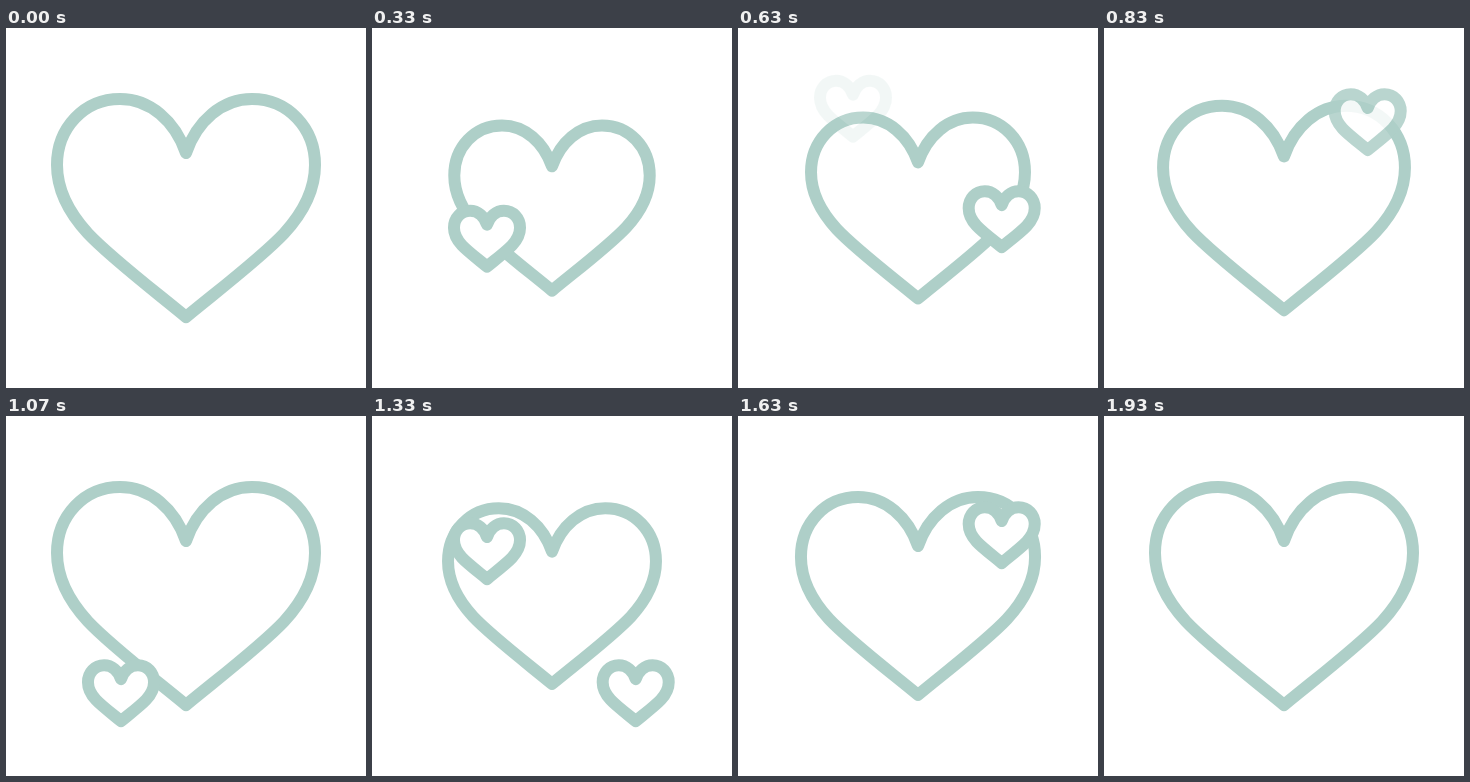
Write an HTML page without scripts that moves like this. It is 360 px wide and 360 px high and loops after 2 s.

```html
<!DOCTYPE html>
<html lang="en">
<head>
<meta charset="utf-8">
<title>Beating heart</title>
<style>
  /* clock in ticks, 30 per second */
  @property --t {
    syntax: "<number>";
    inherits: true;
    initial-value: 0;
  }

  html, body {
    margin: 0;
    width: 100%;
    height: 100%;
    overflow: hidden;
    background: #fff;
  }

  svg {
    display: block;
    width: 360px;
    height: 360px;
    animation: tick 2s steps(60) -5ms infinite;
  }

  @keyframes tick {
    from { --t: 0; }
    to { --t: 60; }
  }

  use {
    fill: #fff;
    stroke: #aecfc8;
    stroke-linejoin: round;
    /* keeps the line 12px wide at any scale */
    stroke-width: calc(12px / var(--s));
  }

  /* two beats, each shrinking and growing along a cosine */
  .big {
    --in1: cos(clamp(0, (var(--t) - 2) / 9, 1) * 180deg);
    --out1: cos(clamp(0, (var(--t) - 11) / 21, 1) * 180deg);
    --in2: cos(clamp(0, (var(--t) - 32) / 8, 1) * 180deg);
    --out2: cos(clamp(0, (var(--t) - 40) / 17.5, 1) * 180deg);
    --s: calc(1 - .125 * (var(--out1) - var(--in1)) - .097 * (var(--out2) - var(--in2)));
    transform: translate(180px, 180px) scale(var(--s));
  }

  /* rises for 18 ticks from --at, fading over 4 at both ends */
  .small {
    --s: .256;
    --age: clamp(0, var(--t) - var(--at), 18);
    --edge: min(var(--age), 18 - var(--age), 4);
    --y: calc(191.25px + 112.25px * cos(var(--age) * 10deg));
    opacity: calc(.5 - .5 * cos(var(--edge) * 45deg));
    transform: translate(var(--x), var(--y)) scale(var(--s));
  }

  .left { --x: 115px; }
  .right { --x: 263.7px; }
</style>
</head>
<body>
<svg viewBox="0 0 360 360">
  <defs>
    <path id="heart" d="M0-55C-11-87-36-109-66-109C-102-109-129-80-129-43C-129-16-115 7-98 25.5C-76 49-34 81 0 109C34 81 76 49 98 25.5C115 7 129-16 129-43C129-80 102-109 66-109C36-109 11-87 0-55Z"/>
  </defs>
  <use class="big" href="#heart"/>
  <use class="small left" href="#heart" style="--at: 2"/>
  <use class="small right" href="#heart" style="--at: 10"/>
  <use class="small left" href="#heart" style="--at: 28"/>
  <use class="small right" href="#heart" style="--at: 36"/>
</svg>
</body>
</html>
```
